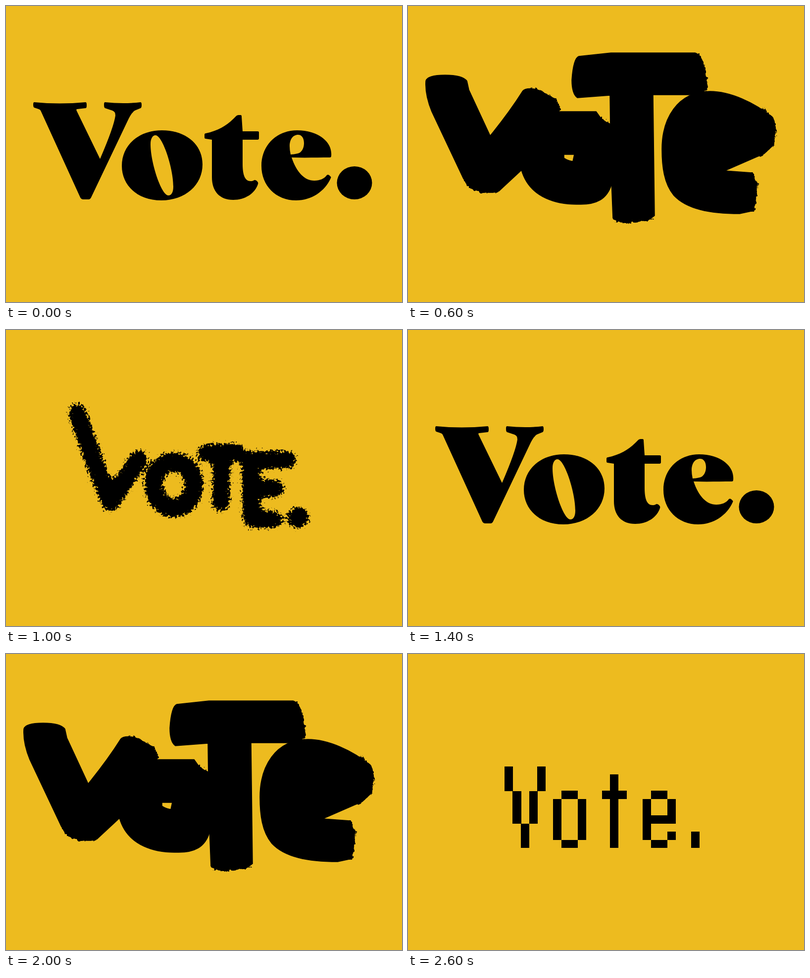
Write an HTML page that moves like this. It is 800 px wide and 600 px high and loops after 2800 ms.

```html
<!DOCTYPE html>
<html lang="en">
<head>
<meta charset="utf-8">
<title>Vote</title>
<style>
  html, body { margin: 0; width: 100%; height: 100%; overflow: hidden; background: #edbb1f; }
  svg { display: block; width: 800px; height: 600px; }
  .style { visibility: hidden; fill-rule: evenodd; }
  .style.on { visibility: visible; }
  .line { fill: none; stroke: #000; stroke-linecap: round; stroke-linejoin: round; }
  .brush { stroke: #000; stroke-width: 1.5; stroke-linejoin: round; }
</style>
</head>
<body>
<svg viewBox="0 0 800 600">
  <defs>
    <filter id="spray" filterUnits="userSpaceOnUse" x="90" y="120" width="550" height="310">
      <feGaussianBlur in="SourceAlpha" stdDeviation="8" result="soft"/>
      <feTurbulence type="fractalNoise" baseFrequency="0.24" numOctaves="2" seed="7" result="grain"/>
      <feComposite in="soft" in2="grain" operator="arithmetic" k2="0.55" k3="0.55"/>
      <feColorMatrix values="0 0 0 0 0  0 0 0 0 0  0 0 0 0 0  0 0 0 14 -7.1"/>
    </filter>
    <filter id="ragged" filterUnits="userSpaceOnUse" x="0" y="60" width="800" height="420">
      <feTurbulence type="fractalNoise" baseFrequency="0.16" numOctaves="3" seed="4"/>
      <feDisplacementMap in="SourceGraphic" scale="10" xChannelSelector="R" yChannelSelector="A"/>
    </filter>
  </defs>

  <!-- fat serif -->
  <g class="style">
    <path d="M57 195Q108 200 161 195Q163 195 163 201Q163 207 161 207L144 209Q141 209 143 213L190 310Q218 245 221 222Q221 214 215 212L200 207Q198 206 198 200Q198 195 200 195Q237 199 272 195Q274 195 274 201Q274 206 272 207L260 212Q255 215 248 228L172 388Q170 392 167 392H156Q152 392 150 388L70 212Q69 210 66 209L57 206Q55 205 55 200Q55 195 57 195Z"/>
    <path d="M315 252C364 252 397 281 397 321C397 363 362 394 314 394C266 394 234 364 234 324C234 282 268 252 315 252ZM302 262C316 262 338 328 338 366C338 378 334 384 328 384C314 384 292 318 292 280C292 269 296 262 302 262Z"/>
    <path d="M401 261Q401 258 404 258C432 252 449 240 465 223Q467 221 470 221H474Q476 221 476 224L478 254H509Q511 254 511 257V268Q511 271 508 271H478V320C478 343 483 355 494 355Q499 355 501 353Q503 352 506 354L508 356Q510 358 509 361C503 380 483 393 459 393C432 393 416 376 416 347V271L403 269Q401 269 401 266Z"/>
    <path d="M657 304Q657 307 654 307C630 307 604 308 577 307C587 337 603 354 623 354C634 354 643 350 648 343Q650 341 653 343L656 346Q657 347 656 349C644 376 617 394 586 394C545 394 516 364 516 324C516 283 546 252 588 252C630 252 660 275 657 304ZM575 301Q589 300 594 297C600 292 602 285 602 278C602 267 597 261 590 261C580 261 573 270 573 284Q573 292 575 301Z"/>
    <ellipse cx="704" cy="358.5" rx="35.5" ry="33.5"/>
  </g>

  <!-- condensed sans -->
  <g class="style">
    <path d="M71 175H130L152 318L174 175H232L184 393H119Z"/>
    <path d="M314 175C364 175 388 205 388 250V318C388 363 364 393 314 393C264 393 240 363 240 318V250C240 205 264 175 314 175ZM314 223C300 223 294 233 294 250V318C294 335 300 345 314 345C328 345 334 335 334 318V250C334 233 328 223 314 223Z"/>
    <path d="M396 175H530V225H490V393H436V225H396Z"/>
    <path d="M543 175H652V225H597V258H642V307H597V343H652V393H543Z"/>
    <path d="M668 342H719V393H668Z"/>
  </g>

  <!-- swash italic -->
  <g class="style">
    <path d="M222 222C212 223 196 218 180 211C160 204 145 199 129 199C114 199 105 206 105 217C105 227 112 234 122 234C130 234 137 230 141 223Q155 229 155 242C155 260 141 273 121 273C101 273 85 257 85 236C85 214 103 196 129 196C145 196 160 201 180 209C198 216 212 221 221 220Q226 220 228 217Q230 213 226 210Q222 208 219 211Q216 209 216 203C216 197 221 191 229 191C237 191 243 196 243 204Q243 214 229 219C213 228 206 245 206 272C206 305 227 350 227 371C227 381 221 390 208 400C250 376 300 315 304 278C306 262 299 251 286 251C277 251 270 256 267 263C253 263 245 254 245 240C245 222 257 210 275 210C297 210 311 229 311 256C311 303 270 359 203 404L201 403Q203 398 203 391C203 357 154 318 154 276C154 243 190 222 222 222Z"/>
    <path d="M381 260C420 260 444 285 444 317C444 360 408 394 363 394C326 394 302 370 302 338C302 294 337 260 381 260ZM383 263C393 263 398 273 398 293C398 342 384 391 362 391C352 391 348 381 348 362C348 315 361 263 383 263Z"/>
    <path d="M520 215H523L517 262H532V265H516L501 350Q496 386 507 392V394Q498 395 490 394C466 394 455 383 455 363Q455 355 458 342L469 265H459V262H470C500 262 517 243 520 215Z"/>
    <path d="M645 349C628 377 602 394 574 394C543 394 523 373 523 341C523 295 560 260 607 260C637 260 655 272 655 289C655 308 634 320 605 320C592 320 580 318 572 315Q570 320 570 327C570 352 583 368 605 367C620 366 633 360 645 349ZM573 313C595 313 618 303 618 282C618 270 613 263 605 263C588 263 574 291 573 313Z"/>
    <ellipse cx="687" cy="370" rx="25" ry="23" transform="rotate(-45 687 370)"/>
  </g>

  <!-- wide brush -->
  <g class="style">
    <g class="brush">
      <path d="M36 152C38 142 58 140 75 140Q110 140 119 152L123 170L166 263Q205 215 232 172Q238 165 260 169L296 188L305 212L300 240L228 334L184 375Q172 380 150 377L120 363L111 348L48 214Q34 180 36 152Z"/>
      <path d="M290 214H380L390 228L411 243V362C402 392 380 403 345 402C306 403 246 392 229 332L240 250ZM315 301H336L333 315Q322 313 315 308Z"/>
      <path d="M331 150Q334 106 345 102L410 95H580Q594 100 598 125L605 165Q596 176 585 180H495L498 425Q490 433 470 435L430 438L414 430L410 330L408 181L342 186Q331 178 331 150Z"/>
      <path d="M610 173C650 173 700 195 737 226Q743 240 741 260L735 285L720 299L640 334L694 338Q704 355 704 375L698 415L670 421C610 421 563 412 537 384C517 360 513 325 513 290C513 230 543 173 610 173Z"/>
    </g>
    <path class="line" filter="url(#ragged)" stroke-width="6" d="M246 170L262 172L298 190L305 210M116 352L124 366L150 376L180 374M584 99L597 122L603 166L590 176M417 418L421 434L450 437L490 430M718 210L736 230L741 252L735 282L710 303M694 341L703 360L701 382L697 412M378 219L390 230L408 242"/>
  </g>

  <!-- rounded sans -->
  <g class="style">
    <path d="M58 245C55 234 62 228 76 228H84C97 228 104 233 108 244L139 332L169 244C174 233 181 228 194 228H199C213 228 221 234 219 243L216 252L165 372C160 385 152 390 141 390H133C122 390 115 386 110 374L60 252Z"/>
    <path d="M313 226C364 226 399 260 399 308C399 357 363 392 313 392C263 392 227 357 227 309C227 260 263 226 313 226ZM313 265C288 265 273 282 273 309C273 336 288 353 313 353C338 353 354 336 354 309C354 282 338 265 313 265Z"/>
    <path d="M423 229H522C534 229 541 237 541 249C541 262 534 270 522 270H495V371C495 383 487 390 475 390H470C458 390 450 383 450 371V270H423C411 270 404 262 404 250C404 237 411 229 423 229Z"/>
    <path d="M583 229H645C657 229 664 237 664 248C664 260 657 267 645 267H606V287H637C648 287 655 294 655 306C655 318 648 325 637 325H606V351H650C662 351 668 358 668 369V371C668 383 662 389 650 389H583C570 389 563 382 563 369V249C563 236 570 229 583 229Z"/>
    <rect x="688" y="341" width="50" height="50" rx="23"/>
  </g>

  <!-- spray -->
  <g class="style">
    <g filter="url(#spray)">
      <path class="line" stroke-width="36" d="M144 167Q174 260 211 350L268 261"/>
      <ellipse class="line" stroke-width="37" cx="339" cy="314" rx="41" ry="47"/>
      <path class="line" stroke-width="35" d="M403 249L466 248M436 250L434 351M570 263L493 264L496 383L541 384M497 321H545"/>
      <circle cx="590" cy="380" r="22"/>
    </g>
  </g>

  <!-- pixel -->
  <g class="style" shape-rendering="crispEdges">
    <path d="M195 228H212V278H195ZM261 228H278V278H261ZM211 278H229V344H211ZM245 278H262V344H245ZM228 344H245V393H228Z"/>
    <path d="M310 277H343V294H310ZM293 294H310V377H293ZM343 294H360V377H343ZM310 377H343V393H310Z"/>
    <path d="M408 244H425V277H442V294H425V393H408V294H392V277H408Z"/>
    <path d="M491 277H524V294H491ZM474 294H491V377H474ZM524 294H541V344H491V327H524ZM524 360H541V377H524ZM491 377H524V393H491Z"/>
    <path d="M572 360H589V393H572Z"/>
  </g>
</svg>
<script>
  const HOLD = 200;
  const styles = [...document.querySelectorAll('.style')];
  const start = performance.now();
  let current = -1;

  function draw() {
    const next = Math.floor((performance.now() - start) / HOLD) % styles.length;
    if (next !== current) {
      styles.forEach((el, i) => el.classList.toggle('on', i === next));
      current = next;
    }
    requestAnimationFrame(draw);
  }
  draw();
</script>
</body>
</html>
```
